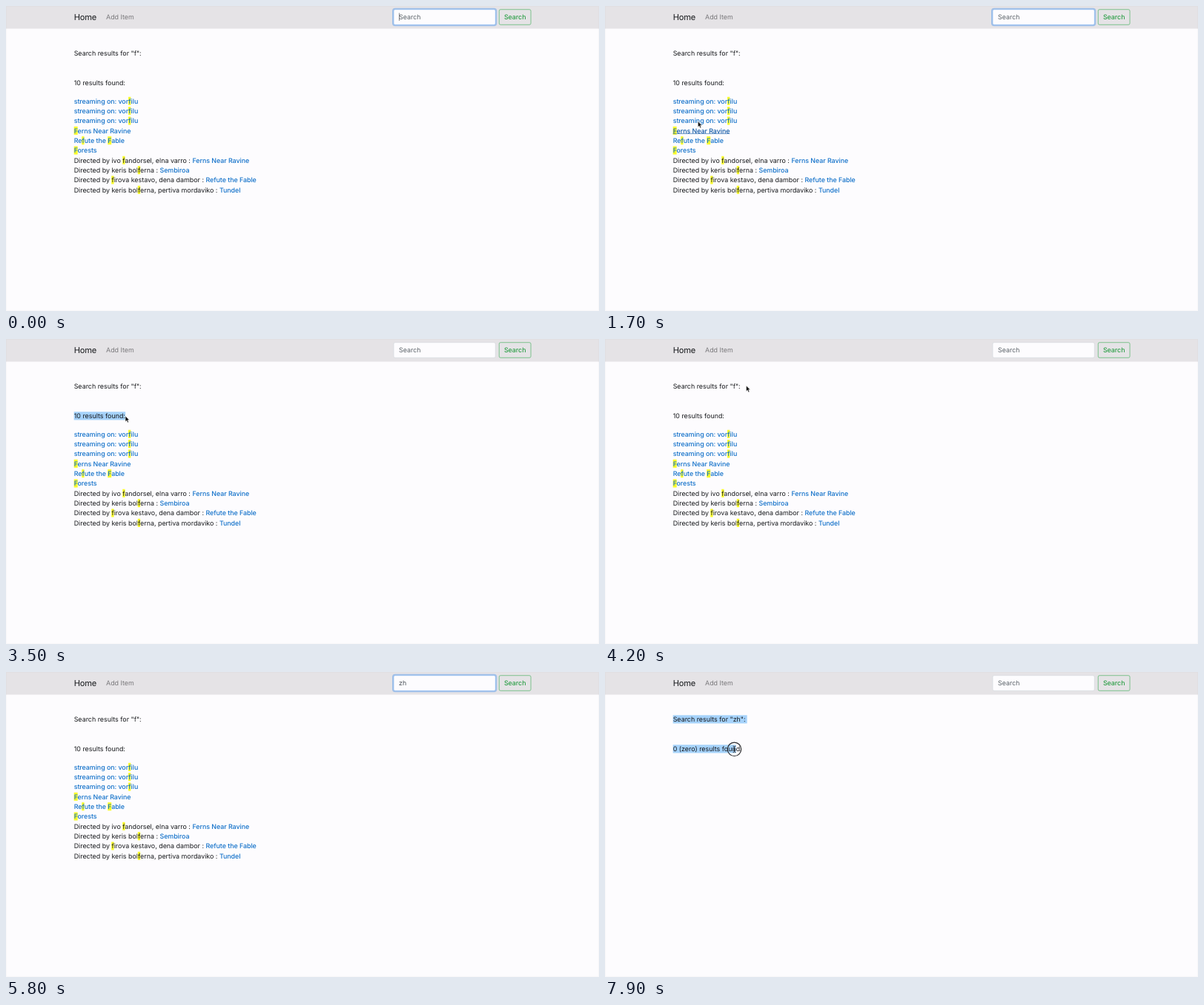
An HTML page for the animation above (8000 ms loop, 800 px wide and 412 px high).

```html
<!DOCTYPE html>
<html lang="en">
<head>
<meta charset="utf-8">
<title>Search results</title>
<style>
  html, body { margin: 0; width: 100%; height: 100%; overflow: hidden; }
  body { position: relative; background: #fdfcfe; cursor: default; }
  body::after {
    content: ""; position: absolute; inset: 0; pointer-events: none;
    box-shadow: inset 0 0 0 1px rgba(0, 0, 0, .02);
  }
  /* A 1440px wide page shown at stage size */
  #page {
    position: absolute; left: 0; top: 0; width: 1440px; height: 742px;
    transform: scale(.55556); transform-origin: 0 0; color: #17191c;
    font: 16px/24px Inter, Roboto, sans-serif; white-space: pre;
    text-rendering: geometricPrecision;
  }
  nav { position: absolute; inset: 0 0 auto; height: 55px; background: #e5e3e6; }
  nav > * { position: absolute; box-sizing: border-box; }
  .brand { left: 165px; top: 15px; font-size: 20px; letter-spacing: -.36px; }
  .item { left: 243px; top: 15px; color: #7a797c; }
  .field {
    left: 941px; top: 8px; width: 248px; height: 38px; padding-left: 12px;
    line-height: 36px; background: #fdfcfe; color: #495057;
    border: 1px solid #ced4da; border-radius: 4px;
  }
  .field.focus { border-color: #80b5f0; box-shadow: 0 0 0 3.2px rgba(20, 120, 235, .32); }
  .hint { color: #5c6369; }
  .caret { position: relative; }
  .caret::after {
    content: ""; position: absolute; left: 0; top: 0;
    width: 1px; height: 19px; background: #333;
  }
  .button {
    left: 1197px; top: 8px; width: 78px; height: 38px; line-height: 36px;
    text-align: center; color: #2e9f49; font-weight: 500; letter-spacing: -.1px;
    border: 1px solid #28a745; border-radius: 4px;
  }
  .line { position: absolute; left: 165px; width: fit-content; }
  #query { top: 103px; }
  #count { top: 175px; }
  #list { position: absolute; left: 165px; top: 219px; }
  .row { width: fit-content; }
  a { color: #1070c9; font-weight: 500; letter-spacing: -.1px; }
  a.hover { color: #0c56a5; text-decoration: underline; }
  mark { background: #f9fb2b; color: inherit; }
  .sel { background: #a5d2fb; }
  .sel.wide { padding-right: 4px; }
  #pointer { position: absolute; left: 0; top: 0; overflow: visible; pointer-events: none; }
  [hidden] { display: none !important; }
</style>
</head>
<body>
<div id="page">
  <nav>
    <span class="brand">Home</span>
    <span class="item">Add Item</span>
    <div class="field" id="field"><span id="typed"></span><span class="caret" id="caret"></span><span class="hint" id="hint">Search</span></div>
    <div class="button">Search</div>
  </nav>
  <div class="line" id="query"></div>
  <div class="line" id="count"></div>
  <div id="list"></div>
</div>
<svg id="pointer" width="1" height="1">
  <path id="arrow" d="M0 0V7.7L1.8 6.1L3 8.9L4.4 8.3L3.2 5.6H5.5Z" fill="#111" stroke="#fff" stroke-width=".5"/>
  <path id="beam" d="M-1.9-4.2Q0-4.2 0-3V3Q0 4.2-1.9 4.2M1.9-4.2Q0-4.2 0-3M0 3Q0 4.2 1.9 4.2M-1.1 1.2H1.1" fill="none" stroke="#222" stroke-width=".9"/>
  <circle id="press" r="9.2" fill="none" stroke="#2b2b2e" stroke-width="1.2"/>
</svg>
<script>
  const LOOP = 8000, STEP = 100;
  const ui = {};
  for (const id of ['field', 'typed', 'caret', 'hint', 'query', 'count', 'list', 'pointer', 'arrow', 'beam', 'press'])
    ui[id] = document.getElementById(id);

  // Plain rows are links; rows with a second part credit a linked title.
  const ROWS = [
    ['streaming on: vorfilu'], ['streaming on: vorfilu'], ['streaming on: vorfilu'],
    ['Ferns Near Ravine'], ['Refute the Fable'], ['Forests'],
    ['ivo fandorsel, elna varro', 'Ferns Near Ravine'],
    ['keris bolferna', 'Sembiroa'],
    ['firova kestavo, dena dambor', 'Refute the Fable'],
    ['keris bolferna, pertiva mordaviko', 'Tundel']
  ];
  const link = text => `<a>${text}</a>`;
  const highlight = text => text.replace(/f/gi, '<mark>$&</mark>');
  ui.list.innerHTML = ROWS.map(([text, title]) => {
    const body = highlight(text);
    return `<div class="row">${title ? `Directed by ${body} : ${link(title)}` : link(body)}</div>`;
  }).join('');
  const links = [...ui.list.querySelectorAll('a')];

  // Pointer stops: time, x, y
  const PATH = [
    [300, 400, 238], [700, 234, 223], [900, 222, 222], [1000, 196.5, 211.5],
    [1400, 150, 185], [1900, 112, 140], [2600, 98, 109.5], [2800, 93, 104],
    [3300, 161, 104], [3600, 161, 104], [4000, 187, 64], [4200, 190.5, 63],
    [4400, 225, 60], [4900, 590, 15], [6700, 590, 15], [7200, 134, 81],
    [7400, 93, 64], [7900, 174.5, 104.3]
  ];
  const within = (t, from, to) => t >= from && t < to;
  const isShown = t => within(t, 300, 5400) || t >= 6800;
  const isPressed = t => within(t, 2800, 3400) || within(t, 3800, 3900) || within(t, 4900, 5000) || t >= 7400;

  function pointerAt(t) {
    const i = PATH.findIndex(p => p[0] > t);
    if (i === 0) return PATH[0].slice(1);
    if (i < 0) return PATH[PATH.length - 1].slice(1);
    const [t0, x0, y0] = PATH[i - 1], [t1, x1, y1] = PATH[i];
    const k = (t - t0) / (t1 - t0), e = k * k * (3 - 2 * k);
    return [x0 + (x1 - x0) * e, y0 + (y1 - y0) * e];
  }

  const charsTo = x => Math.max(0, Math.round((x - 92) / 3.9));
  function setLine(el, text, selected) {
    const wide = selected > text.length ? ' wide' : '';
    el.innerHTML = selected
      ? `<span class="sel${wide}">${text.slice(0, selected)}</span>${text.slice(selected)}`
      : text;
  }

  function draw(t) {
    const done = t >= 6500;
    const focus = t < 2800 || within(t, 4900, 7400);
    const typed = done || t < 5500 ? '' : t < 5700 ? 'z' : 'zh';
    ui.field.classList.toggle('focus', focus);
    ui.typed.textContent = typed;
    ui.hint.hidden = typed !== '';
    ui.caret.hidden = !focus || t % 1000 >= 500;
    ui.list.hidden = done;

    const [x, y] = pointerAt(t);
    let first = 0, second = 0;
    if (within(t, 2800, 3800)) second = Math.min(17, charsTo(x));
    if (t >= 7400) {
      const low = y > 84;
      first = low ? 99 : charsTo(x);
      second = low ? charsTo(x) : 0;
    }
    setLine(ui.query, `Search results for "${done ? 'zh' : 'f'}":`, first);
    setLine(ui.count, done ? '0 (zero) results found.' : '10 results found:', second);

    // Link hover trails the pointer by one step.
    const before = Math.max(0, t - STEP);
    const under = isShown(before) && document.elementFromPoint(...pointerAt(before));
    const hovered = under && under.closest('a');
    links.forEach(a => a.classList.toggle('hover', a === hovered));

    const target = document.elementFromPoint(x, y);
    const onText = t >= 7400 || within(t, 2800, 3400) ||
      !!(target && target.closest('.line, .row, .field') && !target.closest('a'));
    ui.pointer.style.display = isShown(t) ? '' : 'none';
    ui.pointer.style.transform = `translate(${x}px, ${y}px)`;
    ui.arrow.style.display = onText ? 'none' : '';
    ui.beam.style.display = onText ? '' : 'none';
    ui.press.style.display = isPressed(t) ? '' : 'none';
  }

  let last = -1;
  function tick() {
    const t = Math.floor(performance.now() % LOOP / STEP) * STEP;
    if (t !== last) draw(last = t);
    requestAnimationFrame(tick);
  }
  tick();
</script>
</body>
</html>
```
